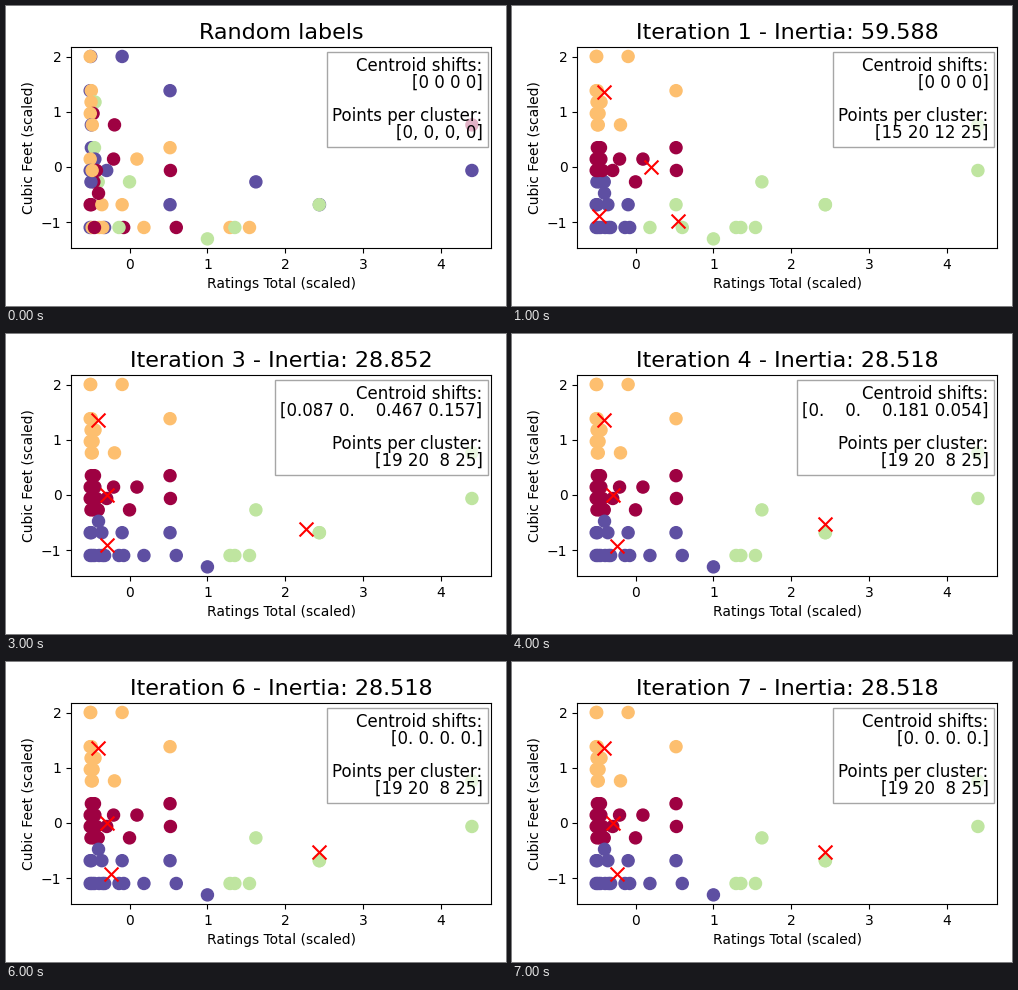
A matplotlib script for the animation above (8000 ms loop, 500x300 px).

```python
import numpy as np
import matplotlib.pyplot as plt
from matplotlib.animation import FuncAnimation

W, H = 500, 300

# Each row: height level, starting labels, scaled ratings; later dots lie on top.
ROWS = [
    (16, "331", [-0.498, -0.095, -0.505]),
    (13, "313", [-0.505, -0.490, 0.520]),
    (12, "21", [-0.443, -0.494]),
    (11, "01", [-0.468, -0.504]),
    (10, "3100", [-0.490, -0.478, -0.193, 4.395]),
    (8, "321", [-0.490, -0.450, 0.520]),
    (7, "3101", [-0.445, -0.505, -0.205, 0.095]),
    (5, "20323", [-0.402, -0.458, -0.495, 0.0, 1.622]),
    (6, "330103", [-0.505, -0.293, -0.425, -0.480, 0.525, 4.395]),
    (3, "0011332", [-0.505, -0.490, -0.355, -0.095, 0.520, 2.438, 2.435]),
    (4, "0", [-0.398]),
    (1, "3113100", [-0.505, -0.480, -0.390, -0.320, -0.345, -0.450, -0.075]),
    (1, "210121", [-0.135, 0.185, 0.600, 1.290, 1.352, 1.540]),
    (0, "2", [1.0]),
]
LOW, STEP = -1.303, 0.2065

points = np.array([(x, LOW + STEP * lv) for lv, _, xs in ROWS for x in xs])
start = np.array([int(c) for _, labels, _ in ROWS for c in labels])

TOP = (-0.400, 1.360)
CENTROIDS = [
    [(0.205, -0.005), TOP, (0.550, -0.985), (-0.475, -0.895)],
    [(-0.235, 0.075), TOP, (1.813, -0.701), (-0.400, -0.810)],
    [(-0.285, 0.005), TOP, (2.270, -0.615), (-0.285, -0.915)],
    [(-0.285, 0.005), TOP, (2.430, -0.529), (-0.234, -0.930)],
]
STATS = [
    ("59.588", "[0 0 0 0]", "[15 20 12 25]"),
    ("31.825", "[0.445 0.    1.299 0.114]", "[19 20  9 24]"),
    ("28.852", "[0.087 0.    0.467 0.157]", "[19 20  8 25]"),
    ("28.518", "[0.    0.    0.181 0.054]", "[19 20  8 25]"),
    ("28.518", "[0. 0. 0. 0.]", "[19 20  8 25]"),
]


def nearest(centers):
    gaps = points[:, None, :] - centers[None, :, :]
    return (gaps ** 2).sum(axis=2).argmin(axis=1)


def summary(shifts, counts):
    return f"Centroid shifts:\n{shifts}\n\nPoints per cluster:\n{counts}"


plt.rcParams["font.family"] = "DejaVu Sans"
fig, ax = plt.subplots(figsize=(W / 100, H / 100), dpi=100)
fig.subplots_adjust(left=65.1 / W, right=485 / W,
                    top=1 - 41.35 / H, bottom=1 - 242 / H)
dots = ax.scatter(points[:, 0], points[:, 1], s=75, c=start,
                  cmap="Spectral", vmin=0, vmax=3)
(x0, y0), (x1, y1) = points.min(axis=0), points.max(axis=0)
mx, my = 0.05 * (x1 - x0), 0.05 * (y1 - y0)
ax.set_xlim(x0 - mx, x1 + mx)
ax.set_ylim(y0 - my, y1 + my)
ax.set_xticks(range(5))
ax.set_yticks(range(-1, 3))
crosses = ax.scatter([0] * 4, [0] * 4, s=100, c="red", marker="x")
title = ax.set_title("Random labels", fontsize=16)
ax.set_xlabel("Ratings Total (scaled)")
ax.set_ylabel("Cubic Feet (scaled)")
info = ax.text(0.98, 0.95, summary("[0 0 0 0]", "[0, 0, 0, 0]"),
               transform=ax.transAxes, fontsize=12, linespacing=0.9,
               ha="right", va="top",
               bbox=dict(facecolor="white", edgecolor="gray", alpha=0.7))


def draw(i):
    crosses.set_visible(i > 0)
    if i == 0:
        dots.set_array(start)
        title.set_text("Random labels")
        info.set_text(summary("[0 0 0 0]", "[0, 0, 0, 0]"))
    else:
        centers = np.array(CENTROIDS[min(i, len(CENTROIDS)) - 1])
        inertia, shifts, counts = STATS[min(i, len(STATS)) - 1]
        dots.set_array(nearest(centers))
        crosses.set_offsets(centers)
        title.set_text(f"Iteration {i} - Inertia: {inertia}")
        info.set_text(summary(shifts, counts))
    return dots, crosses, title, info


anim = FuncAnimation(fig, draw, frames=8, interval=1000, repeat=True,
                     repeat_delay=0, blit=False)
plt.show()
```
